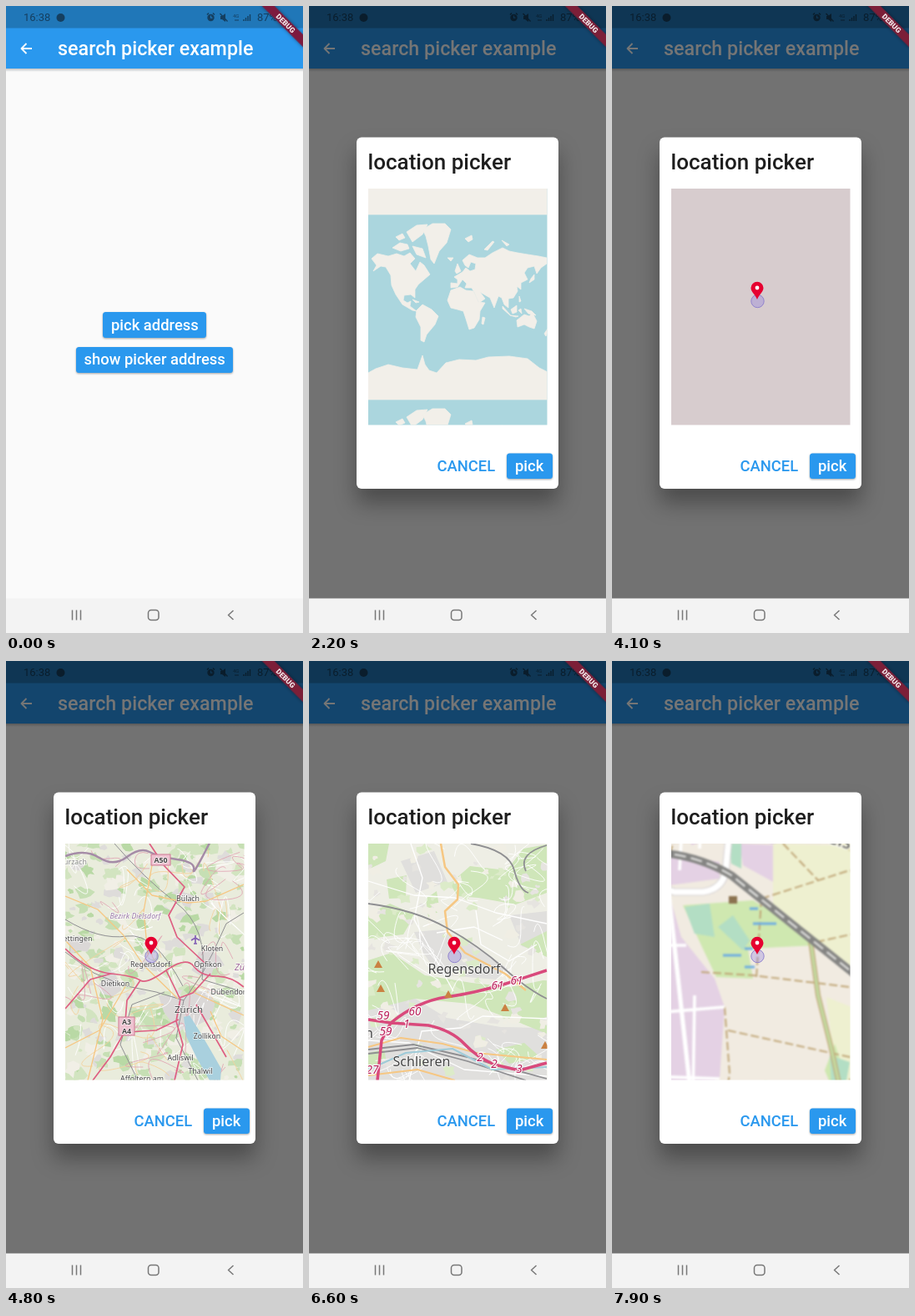
An HTML page for the animation above (8000 ms loop, 356 px wide and 752 px high).

```html
<!DOCTYPE html>
<html lang="en">
<head>
<meta charset="utf-8">
<title>Location picker</title>
<style>
html, body { margin: 0; height: 100%; overflow: hidden; background: #fafafa; }
svg { display: block; }
text { font-family: Roboto, sans-serif; }
path { fill: none; stroke-linejoin: round; }
.med { font-weight: 500; }
.btn { fill: #2a98ee; filter: drop-shadow(0 1.5px 1.2px rgba(0,0,0,.35)); }
.label { font-size: 18.4px; font-weight: 500; fill: #fff; }
.map text { font-family: "Noto Sans", sans-serif; text-anchor: middle; fill: #444; stroke: #fff; stroke-width: 1.6px; stroke-opacity: .75; paint-order: stroke; }
.exit text { font-style: italic; font-size: 13.5px; fill: #b91d58; stroke-width: 2.5px; stroke-opacity: .9; }
.land path { fill: #f2efe9; stroke: #f2efe9; stroke-width: .8; }
.rail { stroke: #8f8f92; }
.pinkroad { stroke: #de5f82; }
.orange { stroke: #f6c783; }
.white { stroke: #fff; }
.track { stroke: #c0a677; stroke-dasharray: 5 2; stroke-width: 1; }
#town { filter: blur(.4px); }
#fields { filter: blur(.5px); }
</style>
</head>
<body>
<svg width="100%" height="100%" viewBox="0 0 356 752">
  <defs>
    <linearGradient id="fall" x2="0" y2="1">
      <stop stop-color="#000" stop-opacity=".22"/><stop offset="1" stop-color="#000" stop-opacity="0"/>
    </linearGradient>
    <clipPath id="showClip"><rect x="84" y="409" width="188" height="31" rx="3.5"/></clipPath>
  </defs>

  <!-- page -->
  <rect width="356" height="752" fill="#fafafa"/>
  <rect y="75" width="356" height="4" fill="url(#fall)"/>
  <rect width="356" height="75" fill="#2a98ee"/>
  <rect width="356" height="26.5" fill="#2077b8"/>
  <g fill="#153f60" stroke="none">
    <text x="21" y="18.4" font-size="13">16:38</text>
    <circle cx="65.500" cy="14" r="5"/>
    <circle cx="245.500" cy="14" r="4.200"/>
    <path d="M241 10l2-1.500M250 10l-2-1.500M245.500 11.500v2.700h2" stroke="#2077b8" stroke-width="1.200"/>
    <path d="M241 10.500l2-2M250 10.500l-2-2" stroke="#153f60" stroke-width="1.500"/>
    <path d="M257 12h2l4-3v10l-4-3h-2z" style="fill:#153f60"/>
    <path d="M256.500 9l9 9.500" stroke="#153f60" stroke-width="1.400"/>
    <text x="272" y="14" font-size="6">4G</text>
    <path d="M274 17h5" stroke="#153f60"/>
    <path d="M285 18v-2M287.500 18v-4M290 18v-6M292.500 18v-8" stroke="#153f60" stroke-width="1.400"/>
    <text x="301" y="18.400" font-size="13">87%</text>
  </g>
  <path d="M31 51H18.500M24.500 45l-6 6 6 6" stroke="#fff" stroke-width="1.800"/>
  <text class="med" x="62" y="59" font-size="23.300" fill="#fff">search picker example</text>
  <rect class="btn" x="116" y="367" width="124" height="31" rx="3.500"/>
  <rect class="btn" x="84" y="409" width="188" height="31" rx="3.500"/>
  <circle id="ripple" cx="144" cy="428" r="32" fill="#fff" opacity=".22" clip-path="url(#showClip)"/>
  <text class="label" x="126" y="388.500">pick address</text>
  <text class="label" x="93.500" y="430">show picker address</text>

  <g id="dialog">
    <rect width="356" height="711" fill-opacity=".54"/>
    <rect x="57" y="157.500" width="242" height="421.500" rx="6" fill="#fff" style="filter:drop-shadow(0 17px 13px rgba(0,0,0,.34))"/>
    <text class="med" x="70.500" y="196" font-size="26" fill="#1e1e1e">location picker</text>
    <text class="label" x="153.500" y="558" style="fill:#2a98ee">CANCEL</text>
    <rect class="btn" x="237" y="536.500" width="55" height="30.500" rx="3.500"/>
    <text class="label" x="247" y="558">pick</text>

    <svg class="map" x="71" y="219" width="214.500" height="283.500" viewBox="71 219 214.500 283.500">
      <g id="world">
        <rect x="-150" y="0" width="700" height="900" fill="#abd6de"/>
        <g id="tile" class="land">
          <path d="M75 303L82 297 95 300 105 297 114 300 121 296 127 303 121 309 128 318 133 307 138 311 145 322 138 328 131 334 127 340 127 350 122 346 114 347 113 353 118 356 122 354 121 360 129 366 124 365 112 358 104 346 99 335 98 323 92 313 86 312 77 318 81 311z"/>
          <path d="M100 290L109 284 118 286 120 291 110 294zM117 271L129 263 142 262 136 274 124 283zM124 288L136 291 140 302 129 298zM104 277l8-4 3 5-7 3z"/>
          <path d="M136 268L148 261 163 261 170 268 165 284 156 294 150 309 146 304 143 288 140 276z"/>
          <path d="M129 365L136 358 147 364 155 372 151 382 146 388 141 394 138 403 134 401 134 385 128 373zM124 352l8 3-4 1z"/>
          <path d="M170 332L178 333 178 328 174 325 184 319 188 314 193 318 199 316 200 309 194 307 191 314 187 311 184 305 192 298 202 302 211 302 220 296 232 290 240 294 250 296 262 298 275 300 285 302 285 309 278 314 273 321 270 312 262 314 258 320 262 328 254 332 254 340 249 336 250 342 245 350 239 351 239 362 234 358 231 350 227 348 222 362 217 350 210 346 205 343 211 351 204 356 198 343 195 338 187 338 189 333 184 328 178 337 170 338z"/>
          <path d="M170 341L181 337 188 341 197 342 203 355 211 356 205 366 204 376 198 386 192 388 188 375 185 366 178 364 170 362 166 353z"/>
          <path d="M208 373l3 1-2 8-2-1zM175 318l3-9 4 9-5 3zM166 302l7 0-3 4zM210 292l10-10 2 1-8 10zM187 279l8-4 1 5-5 3zM231 281l9 5-3 2zM266 327l4-5 0 6-6 4zM232 360l8 9 1 2-9-8zM242 364l7-5 0 8-5 2zM251 365l3-2 1 6zM258 363l9 3 5 5-9-2zM241 371l10 1-3 1zM252 348l2 6-2 1z"/>
          <path d="M249 377L258 370 264 372 268 368 273 378 270 387 264 385 258 382 250 385zM282 393l4-6 1 2-3 7z"/>
          <path d="M60 446L80 435 95 430 112 434 130 436 136 419 139 430 144 437 153 440 164 428 180 424 200 425 215 421 240 420 262 423 276 434 290 441V472H60z"/>
        </g>
        <use href="#tile" y="222"/><use href="#tile" y="-222"/>
      </g>
      <rect id="blank" x="71" y="219" width="215" height="284" fill="#d7ccce"/>

      <g id="region">
        <rect x="71" y="219" width="215" height="284" fill="#e9ecdc"/>
        <g id="regionPatches"></g>
        <path d="M213 427L220 425 232 444 246 468 258 489 257 503H244L229 477 216 450z" style="fill:#a9d0de"/>
        <path d="M71 234Q95 225 112 236T145 235 172 229 205 238 225 250 238 230 242 219" stroke="#a58ca7" stroke-width="2.500"/>
        <g class="rail"><path d="M71 349L105 374 140 389 180 397 213 407 234 377 248 350 264 315 285 302M71 310Q112 335 145 330T212 390M213 407L204 452 230 503M130 219Q165 260 204 290T235 382L285 397M158 503L137 460 151 412 190 397"/></g>
        <g class="orange" stroke-width="1.300"><path d="M71 282L110 298 140 328 165 365 206 405M98 503L116 430 101 367 71 335M285 268L240 288 218 290 175 281 145 250M245 420L258 450 285 468M285 425L224 397M175 245L165 300 170 352M71 464L112 443 145 387"/></g>
        <g class="pinkroad" stroke-width="1.700"><path d="M71 345Q98 372 126 375T161 383 192 371 225 366 252 378 285 391M161 383L145 407 142 445 125 475 104 503M172 219L190 246 214 271 195 305 205 331 238 362M209 405L204 432 212 460 202 503M145 445L180 443 207 430M71 417L101 382 126 375M192 371L208 404 224 398 245 375M228 412L264 475"/></g>
        <g font-size="8.800">
          <rect x="174" y="232" width="23" height="13" fill="#eec2d0" stroke="#cf7894"/>
          <rect x="135" y="427" width="19" height="22" fill="#eec2d0" stroke="#cf7894"/>
          <g font-weight="700"><text x="185.500" y="242">A50</text><text x="144.500" y="436">A3</text><text x="144.500" y="446.500">A4</text></g>
          <text x="83" y="244" style="fill:#888">urzach</text><text x="218" y="288">Bülach</text>
          <text x="155" y="309" font-style="italic" style="fill:#9a78a8">Bezirk Dielsdorf</text>
          <text x="247" y="348">Kloten</text><text x="242" y="367">Opfikon</text><text x="173" y="367">Regensdorf</text>
          <text x="86" y="336">ettingen</text><text x="131" y="390">Dietikon</text><text x="219" y="422" font-size="11.500">Zürich</text>
          <text x="241" y="453">Zollikon</text><text x="268" y="400">Dübendorf</text><text x="209" y="479">Adliswil</text>
          <text x="233" y="495">Thalwil</text><text x="163" y="504">Affoltern am</text>
          <text x="280" y="371" font-size="11" font-style="italic" style="fill:#a06a9a">Zü</text>
        </g>
        <path d="M227 329v10M222 335l5-3 5 3M225 339h4" stroke="#8461b5" stroke-width="1.700"/>
      </g>

      <g id="town">
        <rect x="71" y="219" width="215" height="284" fill="#eeeee5"/>
        <path d="M126 325L160 322 204 345 238 369 224 382 155 376 137 350zM71 417L126 404 165 428 230 439 285 440V503H71zM110 240L150 228 166 265 128 278zM240 305L285 300V352L255 342z" style="fill:#e0dfdd"/>
        <path d="M71 219H96L92 240 71 250zM93 262L117 257 116 284 96 285zM169 267L193 246 237 251 257 225 285 220V278L248 292 203 284 178 282zM71 303L97 291 127 304 113 328 71 333zM71 359L99 350 139 377 195 386 242 391 285 382V447L238 428 193 411 127 405 71 419zM140 285L153 276 157 300 143 307zM253 340L285 324V355zM71 470L90 466 93 481 71 487zM224 466L258 458 277 475 240 483z" style="fill:#cfe6b9"/>
        <g id="townPatches"></g>
        <g class="white" stroke-width="1.300"><path d="M71 264L126 281 175 284 224 302 285 315M122 219L136 260 126 310 145 345 173 396M200 299L206 340 240 360 273 340M71 455L120 458 186 490 285 498M120 503L135 444 182 440 208 426 285 429M153 326L198 319 232 335"/></g>
        <path class="orange" stroke-width="2.500" d="M158 219L163 247 179 268 178 286 163 300 166 325 187 350 235 375 260 395"/>
        <path class="rail" stroke-width="1.800" d="M71 291Q126 298 165 320T233 368 285 405M194 219Q240 227 246 251T263 278M285 221Q250 231 260 252M71 466L125 460 190 475 285 501M71 471L130 464 190 480 260 503"/>
        <path d="M71 490L116 470 172 465 220 490 285 487" stroke="#9fcbd8" stroke-width="2"/>
        <path class="orange" stroke-width="2" d="M71 463L110 452 160 459 200 470 285 478M71 497L130 490 175 503"/>
        <path class="pinkroad" style="stroke:#d94a7c" stroke-width="3.500" d="M71 430L98 434Q130 408 165 403T236 387L285 371M98 434L143 437Q171 443 186 459T222 484L252 491 285 482M98 434L87 455 82 503"/>
        <g id="peaks"></g>
        <g font-size="16"><text x="186" y="375">Regensdorf</text><text x="135" y="486">Schlieren</text><text x="72" y="452">n</text></g>
        <g class="exit" id="exits"></g>
      </g>

      <g id="fields">
        <rect x="71" y="219" width="215" height="284" fill="#f1ebe1"/>
        <path d="M71 219H107L98 262 71 270zM71 415L132 430 192 460 180 503H71zM98 374L118 380 114 401 96 398z" style="fill:#e2e0df"/>
        <path d="M108 219H143L135 252 111 260zM98 265L128 270 128 280 98 284zM140 259L163 260 162 283 142 272zM71 285L98 290 105 315 125 340 131 357 128 400 102 412 71 398zM150 226L170 235 161 260 146 254zM230 366L249 375 285 407V432L238 407zM230 405L260 420 246 459 221 445zM270 276H285V318L268 300zM240 460L270 466 263 490 240 482z" style="fill:#e4d1e4"/>
        <path d="M160 259L240 261 268 280 259 328 285 370V394L206 333 160 295zM192 351L230 366 221 412 198 402zM190 270L205 238 285 246V264z" style="fill:#eef0d0"/>
        <path d="M106 296L148 293 188 317 186 320 145 322 148 340 126 339 117 320zM235 302L247 297 252 307 241 313zM251 226L272 223 270 248 250 248zM197 379L204 400 196 407 191 395zM155 401l10 4-2 10-10-4z" style="fill:#cfe8b0"/>
        <path d="M107 297L122 295 125 315 113 313zM127 309L136 302 146 317 142 323zM134 259h7v15l-6-3zM194 386L206 390 204 401 195 404z" style="fill:#b3dec4"/>
        <path class="track" d="M153 292L206 275 285 293M166 259L187 281M117 336L148 338 206 345 285 371M133 371L206 387 285 402M153 292L150 340M131 357L134 397 128 435M186 318L250 304 285 319M206 400L225 460 285 500M222 275L216 328M98 265L115 219M128 412L198 425 240 420"/>
        <path d="M182.500 317L187 350 194.500 380 200 405 207 440" stroke="#c0a677" stroke-width="3"/>
        <path d="M182.500 317L187 350 194.500 380 200 405 207 440" stroke="#c3d9a0" stroke-width="1.800"/>
        <path d="M146 298h5M148 307h14M130 326h11M143 322h5M143 333h6" stroke="#6faee0" stroke-width="1.400"/>
        <g class="white" stroke-width="1.800"><path d="M71 320L108 320M71 362L131 357M71 398L128 400M113 350L112 413M71 425L140 435 190 463M71 455L132 455 182 474M71 482L135 474 181 490M90 426L95 503M115 430L122 503M147 439L143 503M172 453L165 503M71 242H104M84 219L82 257M107 219L104 275M118 219L116 262"/></g>
        <path d="M72 279L101 288H118Q132 286 132 271L137 219" stroke="#d7d3d4" stroke-width="4.600"/>
        <path class="white" stroke-width="3.500" d="M72 279L101 288H118Q132 286 132 271L137 219"/>
        <path class="white" stroke-width="2.600" d="M97 285L102 330 111 412"/>
        <path d="M71 228Q125 230 153 238T208 260L285 268" stroke="#d9d0a2" stroke-width="8"/>
        <path d="M71 228Q125 230 153 238T208 260L285 268" stroke="#f7f2b6" stroke-width="6.500"/>
        <path stroke="#858583" stroke-width="4.800" d="M71 264Q109 262 135 278L206 335 286 400"/>
        <path stroke="#d8d8d6" stroke-width="1.300" stroke-dasharray="7 3" d="M71 264Q109 262 135 278L206 335 286 400"/>
        <rect x="83" y="260" width="10" height="10" fill="#5c70bd"/>
        <path d="M133.500 290.500h5v4.500h-5z" style="fill:#8b7350"/>
        <text font-size="10.500" transform="translate(198 260) rotate(17)">Trumbelstrasse</text>
        <rect x="275" y="269" width="16" height="13" fill="#f7f2b6" stroke="#bbb68a"/>
        <text x="283" y="279.500" font-size="11">2</text>
        <rect x="71" y="426" width="20" height="22" fill="#d7d4d4"/>
        <text x="81" y="446" font-size="25" style="fill:#696969">al</text>
        <text x="113" y="441" font-size="14">llikon</text>
      </g>

      <g id="pin">
        <circle cx="174.500" cy="354" r="7.700" fill="#7864e6" fill-opacity=".27" stroke="#8c7dcc" stroke-width=".9"/>
        <path d="M174 352C171 345 166.500 343 166.500 338A7.500 7.200 0 0 1 181.500 338C181.500 343 177 345 174 352z" style="fill:#e60030"/>
        <circle cx="174" cy="338" r="2.400" fill="#fff"/>
      </g>
    </svg>
  </g>

  <g transform="translate(356 0) rotate(45)">
    <rect id="banner" x="-36" y="24.200" width="72" height="10.500" style="filter:drop-shadow(0 0 2px rgba(0,0,0,.4))"/>
    <text y="32.600" font-size="8.800" font-weight="900" fill="#f3e8ea" text-anchor="middle">DEBUG</text>
  </g>
  <rect y="710.500" width="356" height="41.500" fill="#f3f3f3"/>
  <g stroke="#777" stroke-width="1.500" fill="none">
    <path d="M79.500 724.500v12M84.500 724.500v12M89.500 724.500v12M272.500 725l-6 5.500 6 5.500"/>
    <rect x="170.500" y="724.500" width="12.500" height="12" rx="3.500"/>
  </g>
</svg>

<script>
const $ = id => document.getElementById(id);
const clamp = v => Math.max(0, Math.min(1, v));
const ramp = (t, a, b) => clamp((t - a) / (b - a));
const show = (id, alpha) => {
  $(id).style.display = alpha > 0 ? '' : 'none';
  $(id).setAttribute('opacity', alpha);
};
// Scale about (x, y), which lands on (tx, ty).
const zoom = (id, s, x, y, tx = x, ty = y) =>
  $(id).setAttribute('transform', `translate(${tx} ${ty}) scale(${s}) translate(${-x} ${-y})`);

let seed = 29;
const rnd = () => (seed = seed * 16807 % 2147483647) / 2147483647;
const randX = () => 71 + rnd() * 215;
const randY = () => 219 + rnd() * 284;
const repeat = (n, make) => Array.from({ length: n }, (_, i) => make(i)).join('');

function blob(x, y, r, color) {
  const pts = repeat(9, i => {
    const a = i * Math.PI * 2 / 9, d = r * (.4 + rnd() * .9);
    return `${(x + d * Math.cos(a) * 1.2).toFixed(1)},${(y + d * Math.sin(a)).toFixed(1)} `;
  });
  return `<polygon points="${pts}" fill="${color}"/>`;
}

function lane(color, width, reach) {
  const step = () => `${((rnd() - .5) * reach).toFixed(1)} ${((rnd() - .5) * reach).toFixed(1)} `;
  return `<path d="M${randX().toFixed(1)} ${randY().toFixed(1)}q${step()}${step()}t${step()}" stroke="${color}" stroke-width="${width}"/>`;
}

const greens = ['#b9d9a5', '#d2e4c0', '#dedcda', '#c6dfb4', '#f1efe6'];
const towns = [[219, 412, 25], [242, 365, 16], [174, 365, 10], [125, 385, 14], [85, 340, 11], [218, 285, 9]];
$('regionPatches').innerHTML =
  repeat(330, i => blob(randX(), randY(), 2 + rnd() * 7, greens[i % 5])) +
  towns.map(p => blob(...p, '#dbd8d7')).join('') +
  repeat(60, i => lane(i % 3 ? '#fff' : '#f3d3a0', .9, 60)) +
  repeat(22, () => lane('#e0a0b0', .8, 50));

$('townPatches').innerHTML =
  repeat(110, i => blob(randX(), randY(), 2 + rnd() * 6, ['#dcebc9', '#e6e4e0', '#f0eee4'][i % 3])) +
  repeat(70, () => lane('#fff', .9, 55));

$('peaks').innerHTML = [[83, 364], [86, 393], [167, 400], [235, 416], [283, 461]]
  .map(([x, y]) => `<path d="M${x - 5} ${y + 4}h10l-5-9z" style="fill:#ca8142"/>`).join('');
$('exits').innerHTML = [[59, 89, 430], [59, 92, 449], [60, 127, 425], [1, 117, 440], [61, 226, 394],
  [61, 249, 388], [27, 76, 495], [2, 205, 480], [2, 222, 488], [3, 252, 494]]
  .map(([n, x, y]) => `<text x="${x}" y="${y}">${n}</text>`).join('');

function draw(now) {
  const t = Math.floor(now % 8000 / 100) * 100;
  const open = t >= 2200;
  show('ripple', t >= 1800 && !open ? .22 : 0);
  show('dialog', +open);
  $('banner').setAttribute('fill', open ? '#7c1f38' : '#7d1a3e');

  // The world rushes in until its tile is one flat colour.
  const rush = ramp(t, 3400, 4000);
  show('world', +(t < 4000));
  zoom('world', 2 ** (rush * 9), 186, 322, 186 - 12 * rush, 322 + 30 * rush);
  show('blank', t < 4600 ? ramp(t, 3600, 4000) : 0);
  show('pin', +(t >= 4000));

  // Detail levels replace one another during the long zoom.
  const z = t < 7300 ? ramp(t, 5900, 7300) * 4 : 4 + ramp(t, 7300, 7900);
  show('region', z < 2 ? ramp(t, 4300, 4600) : 0);
  show('town', z < 4 ? ramp(z, 1.1, 2) : 0);
  show('fields', ramp(z, 3.1, 4));
  zoom('region', 2 ** z, 174, 352);
  zoom('town', 2 ** (z - 2), 174, 352);
  zoom('fields', 2 ** (z - 4), 127, 299);
}

const start = performance.now();
(function tick() {
  draw(performance.now() - start);
  requestAnimationFrame(tick);
})();
</script>
</body>
</html>
```
